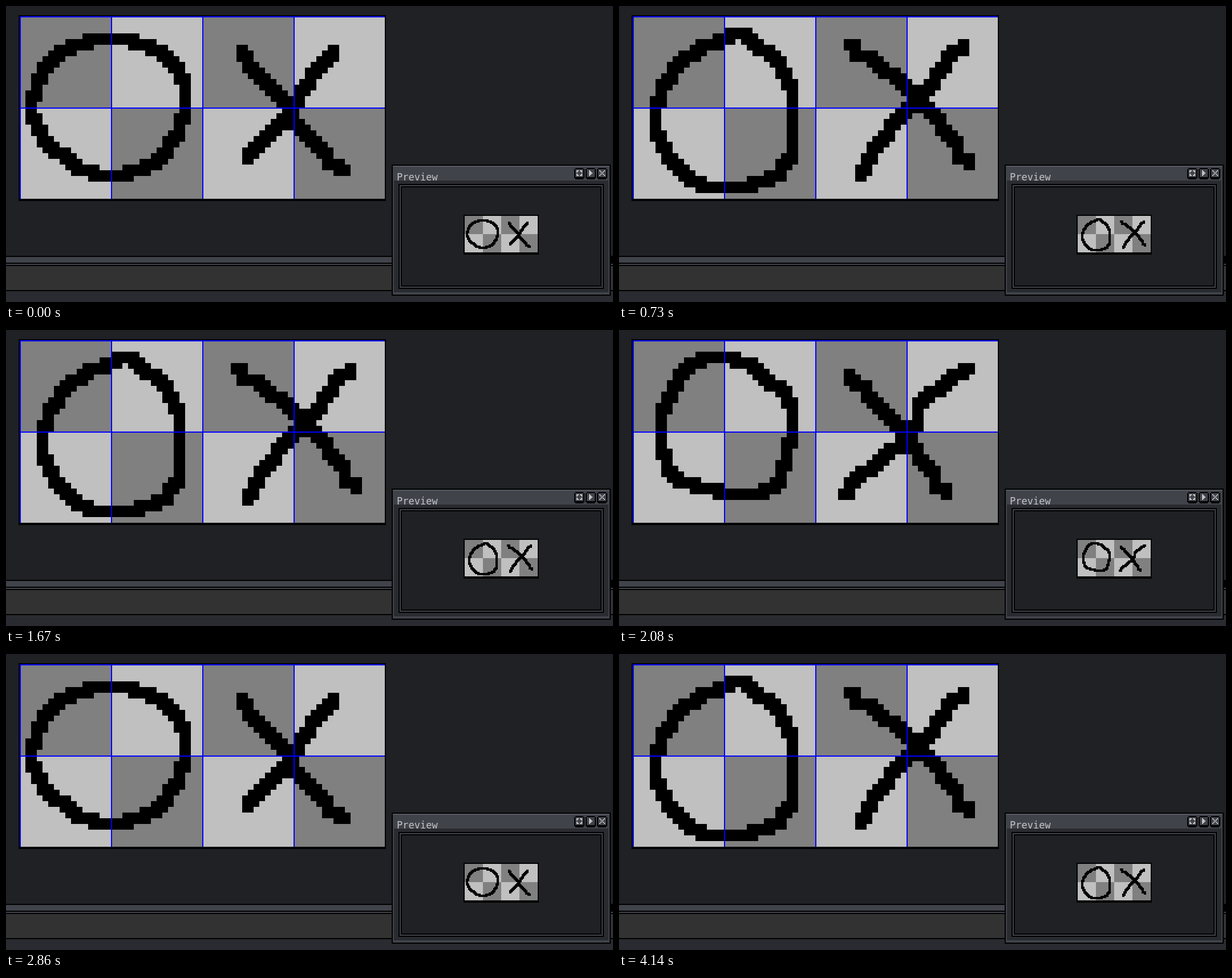
An HTML page with a canvas that plays this animation: 1064x519 px, repeating every 4220 ms.

```html
<!DOCTYPE html>
<html lang="en">
<head>
<meta charset="utf-8">
<title>Sprite preview</title>
<style>
html, body { margin: 0; width: 100%; height: 100%; overflow: hidden; background: #202125; }
svg, canvas { position: absolute; }
svg { left: 0; top: 0; shape-rendering: crispEdges; }
canvas { image-rendering: pixelated; }
#sheet { left: 24px; top: 18px; width: 640px; height: 320px; }
#mini { left: 804px; top: 368px; width: 128px; height: 64px; }
text { font: 17px "DejaVu Sans Mono", monospace; fill: #c4c4c6; }
</style>
</head>
<body>
<svg width="1064" height="519">
  <!-- sheet frame -->
  <rect x="22" y="16" width="644" height="326"/>

  <!-- lower panels -->
  <rect y="438" width="1064" height="81"/>
  <rect y="440" width="1058" height="10" fill="#41434b"/>
  <rect y="452" width="1064" height="2" fill="#41434b"/>
  <rect y="456" width="1064" height="42" fill="#323232"/>
  <rect y="500" width="1064" height="19" fill="#2a2b30"/>

  <!-- preview window -->
  <rect x="676" y="278" width="384" height="230"/>
  <rect x="678" y="280" width="380" height="226" fill="#41434b"/>
  <rect x="678" y="280" width="380" height="2" fill="#54565d"/>
  <rect x="680" y="306" width="376" height="196" fill="#2a2b30"/>
  <rect x="688" y="312" width="360" height="184"/>
  <rect x="690" y="314" width="356" height="180" fill="#41434b"/>
  <rect x="692" y="316" width="352" height="176"/>
  <rect x="694" y="318" width="348" height="172" fill="#202125"/>
  <rect x="802" y="366" width="132" height="70"/>
  <text x="685" y="306">Preview</text>

  <!-- window buttons -->
  <defs>
    <g id="button">
      <path d="M2 0H16V2H18V18H16V20H2V18H0V2H2Z"/>
      <path d="M2 2H16V16H2Z" fill="#41434b"/>
    </g>
  </defs>
  <use href="#button" x="996" y="284"/>
  <use href="#button" x="1016" y="284"/>
  <use href="#button" x="1036" y="284"/>
  <g fill="#c4c4c6">
    <path d="M1000 288h4v2h-2v2h-2zM1006 288h4v4h-2v-2h-2zM1000 294h2v2h2v2h-4zM1008 294h2v4h-4v-2h2z"/>
    <path d="M1022 288h2v2h2v2h2v2h-2v2h-2v2h-2z"/>
    <path d="M1040 288h2v2h2v2h2v-2h2v-2h2v2h-2v2h-2v2h2v2h2v2h-2v-2h-2v-2h-2v2h-2v2h-2v-2h2v-2h2v-2h-2v-2h-2z"/>
  </g>
</svg>

<canvas id="sheet" width="64" height="32"></canvas>
<canvas id="mini" width="64" height="32"></canvas>
<svg width="1064" height="519">
  <path d="M25 18V338M185 18V338M345 18V338M505 18V338M24 19H664M24 179H664" stroke="#00f" stroke-width="2"/>
</svg>

<script>
const parse = text => text.split(' ').map(p => p.split(',').map(Number));

// Key points of a pose: the closed ring, then both arms of the cross from the bottom up
const poses = [
  ['14,3 8,4 4,7 2,11 1,16 4,22 10,26 16,27 23,25 27,19 28,13 27,8 22,4',
    '56,26 48,18 45,13 38,5', '39,24 46,17 49,12 54,5'],
  ['14,2 8,3 5,6 3,10 3,17 4,23 9,26 15,28 22,26 26,21 26,14 24,9 18,3',
    '56,25 50,19 45,12 39,3', '39,25 41,20 48,13 55,4'],
  ['15,2 9,3 6,7 4,12 4,18 6,23 11,25 17,26 24,25 26,20 27,14 26,8 19,3',
    '54,26 49,18 46,14 37,5', '36,26 47,17 50,10 58,4'],
  ['18,2 12,4 7,7 4,12 3,18 5,24 9,28 15,29 23,28 27,23 27,12 25,7 21,4',
    '58,25 52,16 46,10 37,4', '39,27 43,21 50,13 57,4']
].map(pose => pose.map(parse));

// The last pose lies halfway between its neighbours
poses.push(poses[3].map((line, i) =>
  line.map((p, k) => p.map((v, axis) => (v + poses[0][i][k][axis]) / 2))));

const LOOP = 4220;
const TICK = 100;
const RUN = 6;
const runs = [40, 610, 1180, 1800, 2370, 2960, 3530, 4140];
const TENSION = 0.4;
const layers = ['sheet', 'mini'].map(id => document.getElementById(id).getContext('2d'));

// Cardinal spline from b to c
function spline(a, b, c, d, u) {
  const v = 1 - u;
  return b.map((start, k) =>
    start * v * v * (1 + 2 * u) + c[k] * u * u * (3 - 2 * u) +
    TENSION * u * v * (v * (c[k] - a[k]) - u * (d[k] - start)));
}

// Drags a 2 by 2 pixel brush along a curve, one row or column at a time
function stroke(ctx, pts, closed) {
  const n = pts.length;
  const at = i => closed ? pts[(i + n) % n] : pts[Math.max(0, Math.min(n - 1, i))];
  const stamp = (x, y) => ctx.fillRect(x, y, 2, 2);
  let [px, py] = pts[0].map(Math.round);
  for (let i = 0; i < (closed ? n : n - 1); i++) {
    const b = at(i), c = at(i + 1);
    const count = Math.ceil(Math.max(Math.abs(c[0] - b[0]), Math.abs(c[1] - b[1])));
    for (let s = 0; s <= count; s++) {
      const [x, y] = spline(at(i - 1), b, c, at(i + 2), s / count).map(Math.round);
      const turn = (x - px) * (y - py);
      if (turn < 0) stamp(px, y);
      if (turn > 0) stamp(x, py);
      stamp(x, y);
      [px, py] = [x, y];
    }
  }
}

function paint(ctx, pose) {
  for (let i = 0; i < 8; i++) {
    const col = i % 4, row = i >> 2;
    ctx.fillStyle = (col + row) % 2 ? '#c0c0c0' : '#808080';
    ctx.fillRect(col * 16, row * 16, 16, 16);
  }
  ctx.fillStyle = '#000';
  pose.forEach((line, i) => stroke(ctx, line, i === 0));
}

// Every run shows six drawings; its first one stays a little shorter
function stepAt(t) {
  const run = runs.filter(start => start <= t).length - 1;
  if (run < 0) return 0;
  const tick = Math.floor((t - runs[run] + 20) / TICK);
  return 1 + run * RUN + Math.min(tick, RUN - 1);
}

let shown = -1;
function frame() {
  const now = stepAt(performance.now() % LOOP) % poses.length;
  if (now !== shown) {
    shown = now;
    layers.forEach(ctx => paint(ctx, poses[now]));
  }
  requestAnimationFrame(frame);
}
frame();
</script>
</body>
</html>
```
